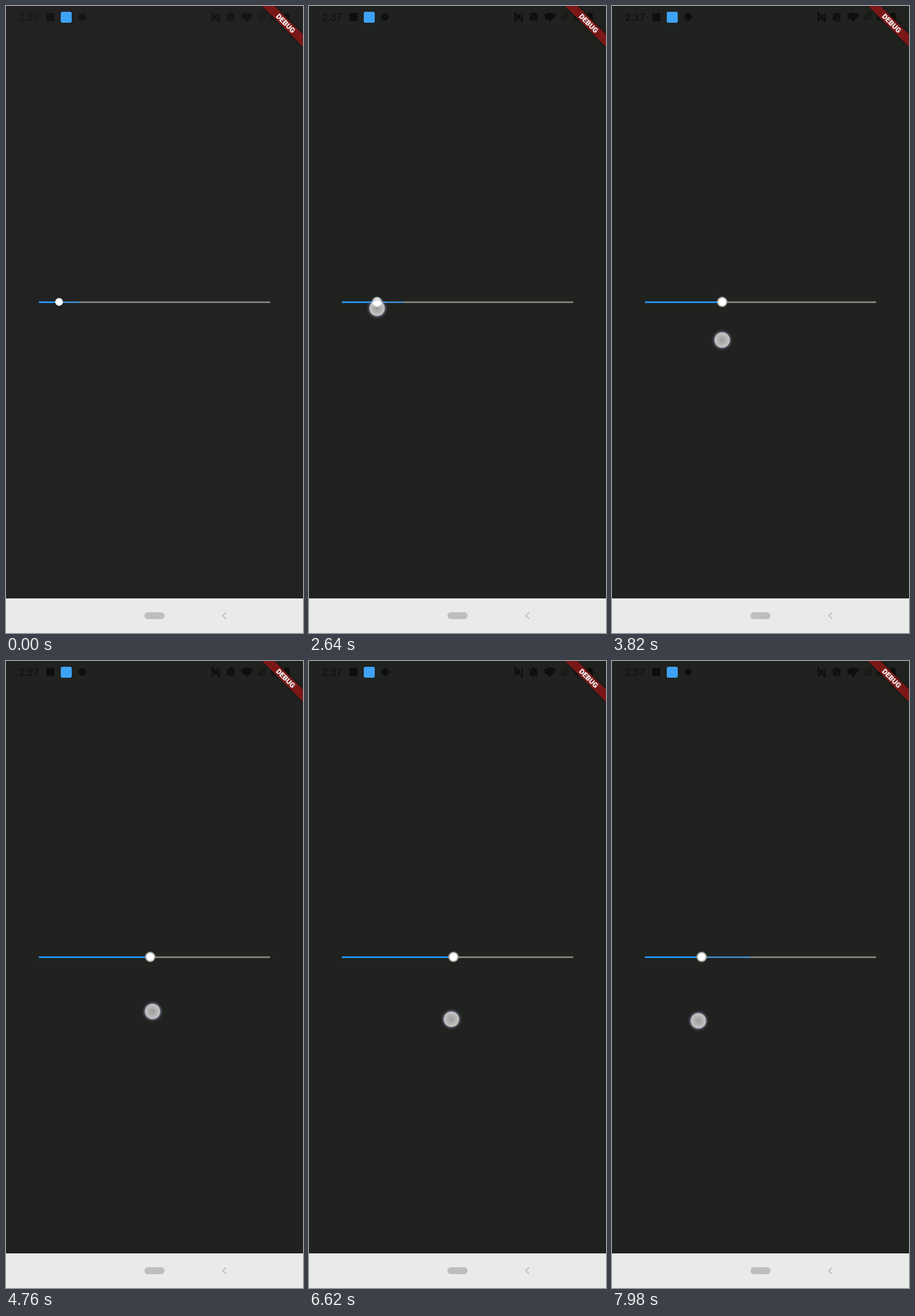
Write an HTML page that moves like this. It is 515x1087 px and loops after 8 s.

```html
<!DOCTYPE html>
<html lang="en">
<head>
<meta charset="utf-8">
<title>Seek bar</title>
<style>
  html, body { margin: 0; width: 100%; height: 100%; overflow: hidden; }
  body { position: relative; background: #20221f; animation: tint 8s linear infinite; }
  body * { position: absolute; }
  svg * { position: static; }

  .status { left: 0; top: 0; animation: settle 8s linear infinite; }
  .app { left: 95px; top: 10px; width: 18.5px; height: 18.5px; border-radius: 3px; background: #3ea2f5; }

  .ribbon {
    left: 465px; top: 35px; width: 100px; height: 15px;
    transform: rotate(45deg); transform-origin: 50px -35px;
    background: #7a1717; box-shadow: 0 0 7.5px rgba(0, 0, 0, .5);
    color: #fff; font: 900 12.75px/15px Roboto, sans-serif; text-align: center;
  }

  .track { left: 57px; top: 512px; width: 400.5px; height: 2.7px; background: #7f807c; overflow: hidden; }
  .buffer { left: -400px; width: 400px; height: 100%; background: #4082ba; animation: buffer 8s linear infinite; }
  .played { left: -457px; width: 400px; height: 100%; background: #2492ec; animation: seek 8s linear infinite; }

  .thumb { left: 0; top: 513.4px; animation: seek 8s linear infinite; }
  .thumb i { left: -9px; top: -9px; width: 18px; height: 18px; border-radius: 50%; }
  .knob { background: radial-gradient(circle, #fff 6.3px, transparent 7px); }
  .halo { background: #a9aba6; animation: press 8s step-end infinite; }

  .touch { left: 0; top: 0; animation: drag 8s linear infinite; }
  .touch i {
    left: -19px; top: -19px; width: 38px; height: 38px;
    background: radial-gradient(circle, rgba(255, 255, 255, .55), rgba(255, 255, 255, .74) 12.8px,
      rgba(150, 150, 190, .48) 13.8px, rgba(140, 140, 180, .2) 16px, transparent 18.5px);
    animation: press 8s step-end infinite;
  }

  .nav { left: 0; right: 0; top: 1027px; bottom: 0; background: #e9ebe8; }
  .home { left: 240px; top: 24px; width: 35px; height: 12px; border-radius: 6px; background: #bebfbd; }
  .back { left: 370px; top: 20px; }

  @keyframes tint { 0% { background: #222; } 10%, 100% { background: #20221f; } }
  @keyframes settle { 0% { opacity: .65; } 10%, 100% { opacity: 1; } }
  @keyframes buffer { from { transform: translateX(70px); } to { transform: translateX(183.3px); } }
  @keyframes press { 0% { opacity: 0; } 26.875%, 100% { opacity: 1; } }

  @keyframes seek {
    0% { transform: translateX(92px); }
    26.875% { transform: translateX(107.2px); }
    31.25% { transform: translateX(108px); }
    33% { transform: translateX(118px); }
    40.5% { transform: translateX(155px); }
    47.75% { transform: translateX(191px); }
    51.25% { transform: translateX(203px); }
    59.5% { transform: translateX(250px); }
    61.75% { transform: translateX(271px); }
    65% { transform: translateX(285px); }
    68.75% { transform: translateX(293px); }
    72.25% { transform: translateX(295px); }
    73.5%, 77.5% { transform: translateX(296.3px); }
    79.4% { transform: translateX(288px); }
    81.25% { transform: translateX(269px); }
    85% { transform: translateX(223px); }
    87.5% { transform: translateX(204px); }
    89.75% { transform: translateX(194px); }
    96.75% { transform: translateX(162px); }
    99.75%, 100% { transform: translateX(155.5px); }
  }

  @keyframes drag {
    0%, 31.25% { transform: translate(107.5px, 517.5px); }
    33% { transform: translate(118px, 524px); }
    40.5% { transform: translate(156px, 548px); }
    47.75% { transform: translate(191px, 579px); }
    51.25% { transform: translate(204px, 590px); }
    59.5% { transform: translate(254px, 607.5px); }
    61.75% { transform: translate(275px, 613px); }
    65% { transform: translate(288px, 616px); }
    68.75% { transform: translate(296px, 617.5px); }
    72.25%, 77.5% { transform: translate(298.5px, 618px); }
    79.4% { transform: translate(288px, 618.5px); }
    81.25% { transform: translate(267px, 620px); }
    85% { transform: translate(217px, 622.5px); }
    87.5% { transform: translate(199px, 623.5px); }
    89.75% { transform: translate(190px, 624px); }
    93.75% { transform: translate(170px, 625.5px); }
    96.75% { transform: translate(157px, 625px); }
    99.75%, 100% { transform: translate(149.7px, 623.7px); }
  }
</style>
</head>
<body>
  <svg class="status" width="515" height="40" fill="#0d0f0c">
    <text x="22.5" y="25.5" font-family="Roboto, sans-serif" font-size="18">2:37</text>
    <rect x="70" y="12" width="14" height="14"/>
    <circle cx="132" cy="19" r="6.5"/>
    <!-- near-field -->
    <path d="M357.500 26.500V12.500L365 21V14M361 25V18L369.500 26.500V12.500" fill="none" stroke="#0d0f0c" stroke-width="2.400"/>
    <!-- muted bell -->
    <path d="M383 24V18Q383 13 388 12V10.500H391V12Q396 13 396 18V24L397 25H382ZM387.500 26H391.500Q389.500 29 387.500 26Z"/>
    <path d="M381.500 12L397 27" stroke="#20221f" stroke-width="1.200"/>
    <path d="M381 13L396 28" stroke="#0d0f0c" stroke-width="1.500"/>
    <!-- wifi -->
    <path d="M407 15.500Q418 7.500 429 15.500L418 27.500L414 23H409V18Z"/>
    <!-- no SIM -->
    <path d="M437 25V17L443 11H450V25Z" opacity=".4"/>
    <path d="M437 12L451 26" stroke="#20221f" stroke-width="1.500"/>
    <!-- signal and battery -->
    <path d="M459 25V17L465 11H476V25Z" opacity=".6"/>
    <path d="M482 13H485V11H489V13H492V27H482Z"/>
  </svg>
  <div class="app"></div>
  <div class="ribbon">DEBUG</div>

  <div class="track">
    <div class="buffer"></div>
    <div class="played"></div>
  </div>
  <div class="thumb"><i class="halo"></i><i class="knob"></i></div>
  <div class="touch"><i></i></div>

  <div class="nav">
    <div class="home"></div>
    <svg class="back" width="18" height="20"><path d="M11.500 4.500L6 10L11.500 15.500" fill="none" stroke="#b4b6b3" stroke-width="1.700"/></svg>
  </div>
</body>
</html>
```
